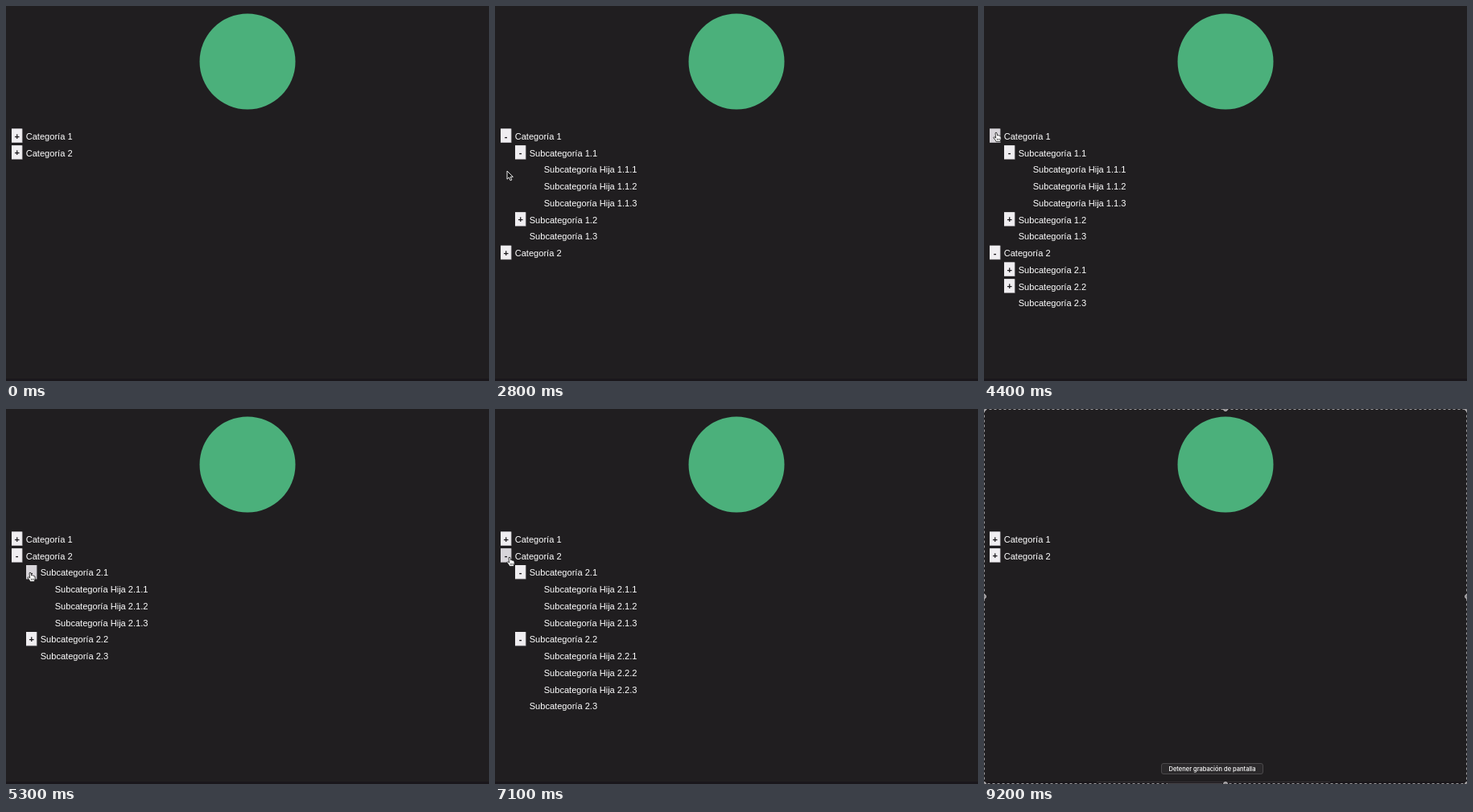
These frames come from a looping animation (600 by 466 pixels, 9.3 s). An HTML page:

```html
<!DOCTYPE html>
<html lang="es">
<head>
<meta charset="utf-8">
<title>Árbol de categorías</title>
<style>
  html, body { margin: 0; width: 100%; height: 100%; overflow: hidden; background: #201e20; }
  svg { display: block; width: 600px; height: 466px; }
  text { font-family: "Liberation Sans", Arial, sans-serif; font-size: 11.08px; fill: #fff; }
  .sign { font-weight: bold; fill: #19171a; text-anchor: middle; }
  .tip { font: 500 7.5px Inter, sans-serif; text-anchor: middle; }
</style>
</head>
<body>
<svg viewBox="0 0 600 466">
  <rect width="600" height="466" fill="#201e20"/>
  <rect y="463" width="600" height="3" fill="#1a171b"/>
  <circle cx="300" cy="69" r="59.5" fill="#4bb07b"/>
  <g id="tree"></g>
  <g id="frame">
    <rect x=".5" y=".5" width="599" height="465" fill="none" stroke="#9b999b" stroke-dasharray="3 3"/>
    <path d="M140 463.5H430" stroke="#353235"/>
    <path d="M228 465.5H296" stroke="#4a474a"/>
    <g id="handles" fill="#8f8d8f" stroke="#d2d0d2" stroke-width=".8"></g>
  </g>
  <g id="tip">
    <rect x="220.5" y="440.5" width="126" height="13" rx="2.5" fill="#2b292b" stroke="#4b494b"/>
    <text class="tip" x="283.5" y="449.6">Detener grabación de pantalla</text>
  </g>
  <g id="cursor" stroke-linejoin="round">
    <path id="arrow" d="M0 0V10.2L2.4 8 4.1 11.8 5.9 11 4.2 7.3H7.4Z" fill="#111" stroke="#fff" stroke-width=".9"/>
    <g id="hand">
      <path d="M-1 .8Q0-.6 1 .8L1.6 4 2.5 3.5 3.4 4.2 4.3 3.9 5 4.8 6 5 6.2 8 5.2 11.6H.2L-1.2 9.2-3.2 6.7Q-3 5.3-1.3 6.2L-.3 7.1Z"
        fill="#fff" stroke="#111" stroke-width=".8"/>
      <path d="M1.3 7.6V10M2.8 7.6V10M4.3 7.6V10" stroke="#111" stroke-width=".6"/>
    </g>
  </g>
</svg>
<script>
const LOOP = 9300, STEP = 100, TOP = 161.5, PITCH = 20.75;
const $ = id => document.getElementById(id);

// open nodes from each time on
const opens = [
  [0, ""], [1300, "1"], [2200, "1 1.1"], [3400, "1 1.1 2"], [4500, "1.1 2"],
  [5300, "1.1 2 2.1"], [6100, "1.1 2 2.1 2.2"], [7200, ""]
];

const easeIn = p => p * p;
const easeOut = p => 1 - (1 - p) ** 2;
const smooth = p => p * p * (3 - 2 * p);

// pointer tip: time, x, y, easing on the way there
const path = [
  [100, 379, 418], [1000, 12, 158, easeOut], [1100, 13, 157], [1500, 13, 157],
  [1600, 20, 161], [2000, 34, 180, easeOut], [2400, 34, 180], [2800, 15, 205, easeIn],
  [3300, 13, 302, easeOut], [3600, 13, 302], [4400, 15, 157, smooth], [4600, 15, 157],
  [5100, 30, 203, smooth], [5400, 30, 203], [5900, 32, 284, smooth], [6300, 32, 284],
  [7100, 18, 184, smooth], [7500, 18, 184], [7600, 128, 342]
];

function pointer(t) {
  const i = path.findIndex(k => k[0] >= t);
  if (i < 0 || t < path[0][0]) return null;
  if (i === 0) return { x: path[0][1], y: path[0][2] };
  const [t0, x0, y0] = path[i - 1], [t1, x1, y1, ease = smooth] = path[i];
  const p = ease((t - t0) / (t1 - t0));
  return { x: x0 + (x1 - x0) * p, y: y0 + (y1 - y0) * p };
}

function listRows(open) {
  const rows = [];
  const add = (id, depth) => {
    const leaf = depth === 2 || id.endsWith(".3");
    const label = ["Categoría", "Subcategoría", "Subcategoría Hija"][depth] + " " + id;
    const isOpen = open.includes(id);
    rows.push({ label, depth, leaf, isOpen, x: 7 + 18 * depth, y: TOP + PITCH * rows.length });
    if (isOpen && !leaf) [1, 2, 3].forEach(n => add(id + "." + n, depth + 1));
  };
  add("1", 0);
  add("2", 0);
  return rows;
}

const isOver = (row, at) => at && !row.leaf &&
  at.x >= row.x && at.x <= row.x + 13.5 && Math.abs(at.y - row.y) <= 8.8;

function drawRow(row, at) {
  const { x, y } = row;
  const button = row.leaf ? "" :
    `<rect x="${x}" y="${y - 9}" width="13.5" height="17.5" fill="#aaa8ab"/>
     <rect x="${x}" y="${y - 9}" width="12.8" height="16.8" fill="${isOver(row, at) ? "#d8d5da" : "#f0eef1"}"/>
     <text class="sign" x="${x + 6.7}" y="${y + 4.2}">${row.isOpen ? "-" : "+"}</text>`;
  return `${button}<text x="${x + 17.7}" y="${y + 4.4}">${row.label}</text>`;
}

const fade = (t, start, steps) => Math.min(1, Math.max(0, ((t - start) / STEP + 1) / steps));

function draw(t) {
  const open = opens.filter(o => o[0] <= t).pop()[1].split(" ");
  const rows = listRows(open), at = pointer(t);
  $("tree").innerHTML = rows.map(row => drawRow(row, at)).join("");

  $("cursor").style.display = at ? "" : "none";
  if (at) {
    const hover = rows.some(row => isOver(row, at));
    $("cursor").setAttribute("transform", `translate(${at.x} ${at.y})`);
    $("hand").style.display = hover ? "" : "none";
    $("arrow").style.display = hover ? "none" : "";
  }
  $("frame").style.opacity = fade(t, 8300, 4);
  $("tip").style.opacity = fade(t, 9100, 2);
}

$("handles").innerHTML = [0, 300, 600].flatMap(x => [0, 233, 466].map(y => [x, y]))
  .filter(([x, y]) => x !== 300 || y !== 233)
  .map(([x, y]) => `<circle cx="${x}" cy="${y}" r="2.5"/>`).join("");

const start = performance.now();
let last = -1;
function tick() {
  const t = Math.floor((performance.now() - start) % LOOP / STEP) * STEP;
  if (t !== last) draw(last = t);
  requestAnimationFrame(tick);
}
tick();
</script>
</body>
</html>
```
